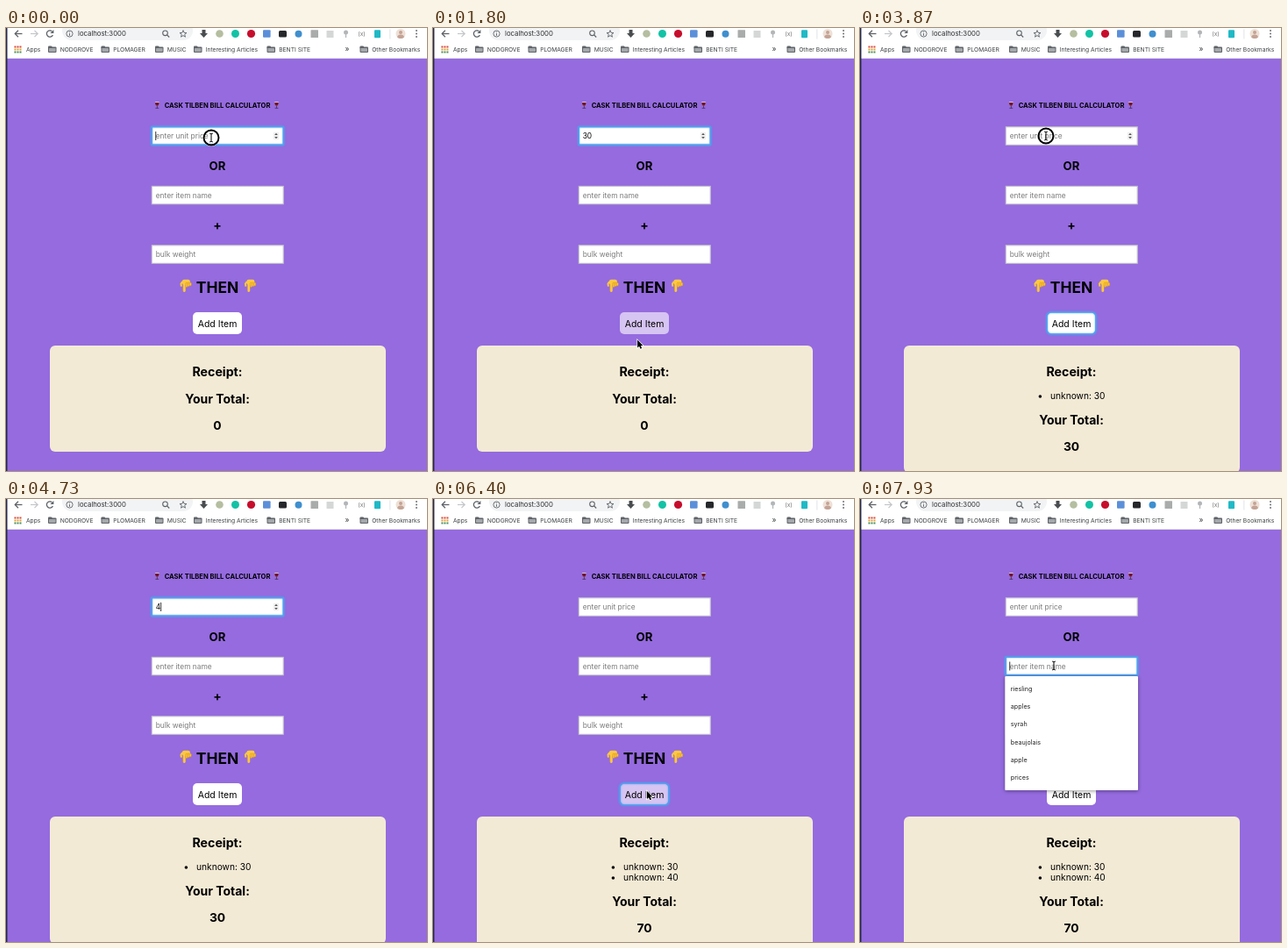
An HTML page with a canvas for the animation above (8 s loop, 480 by 505 pixels).

```html
<!DOCTYPE html>
<html lang="en">
<head>
<meta charset="utf-8">
<title>Bill calculator</title>
<style>
html, body { margin: 0; width: 100%; height: 100%; overflow: hidden; background: #956bdf; }
canvas { display: block; width: 480px; height: 505px; }
</style>
</head>
<body>
<canvas id="stage"></canvas>
<script>
const W = 480, H = 505, LOOP = 8000, LAG = 40;
const canvas = document.getElementById('stage');
const c = canvas.getContext('2d');
const dpr = window.devicePixelRatio || 1;
canvas.width = W * dpr;
canvas.height = H * dpr;

const BLUE = '#4f9fee', GREY = '#5f6368';
const fields = [
  { y: 112.5, hint: 'enter unit price', number: true },
  { y: 180, hint: 'enter item name' },
  { y: 247.5, hint: 'bulk weight', number: true }
];
const options = ['riesling', 'apples', 'syrah', 'beaujolais', 'apple', 'prices'];

// Pointer stops: time, x, y
const path = [
  [0, 234, 125], [1200, 234, 125], [1960, 233, 385], [2250, 240, 338],
  [2400, 240, 338], [3268, 206, 123], [3700, 212, 123], [5200, 212, 123],
  [5829, 230, 336], [6050, 244, 333], [6750, 244, 333], [7500, 221, 190], [8000, 221, 190]
];
const clicks = [[0, 140], [2270, 2400], [3830, 4000], [6160, 6300], [7540, 7700]];
const within = (t, a, b) => t >= a && t < b;

function pointer(t) {
  t = Math.max(0, t);
  let i = 1;
  while (i < path.length - 1 && path[i][0] <= t) i++;
  const [t0, x0, y0] = path[i - 1], [t1, x1, y1] = path[i];
  const u = Math.min(1, (t - t0) / (t1 - t0)), e = u * u * (3 - 2 * u);
  return { x: x0 + (x1 - x0) * e, y: y0 + (y1 - y0) * e };
}

const overField = (p, f) => p.x > 166 && p.x < 316 && p.y > f.y && p.y < f.y + 21;
const overButton = p => p.x > 213 && p.x < 269 && p.y > 324 && p.y < 349.5;

function stateAt(t) {
  const s = { focus: 0, since: 0, price: '', items: [] };
  const events = [
    [870, () => { s.price = '3'; s.since = 870; }],
    [1060, () => { s.price = '30'; s.since = 1060; }],
    [2330, () => { s.price = ''; s.items = [30]; s.focus = 'button'; }],
    [3930, () => { s.focus = 0; s.since = 3930; }],
    [4730, () => { s.price = '4'; s.since = 4730; }],
    [4930, () => { s.price = '40'; s.since = 4930; }],
    [6210, () => { s.price = ''; s.items = [30, 40]; s.focus = 'button'; }],
    [7600, () => { s.focus = 1; s.since = 7600; }]
  ];
  for (const [at, run] of events) if (t >= at) run();
  s.menu = t >= 7800;
  s.hidePointer = within(t, 870, 1200) || within(t, 4730, 5200);
  return s;
}

// y is the middle of the capitals
function text(str, x, y, size, { weight = 400, color = '#000', align = 'left' } = {}) {
  c.font = `${weight} ${size}px Inter, "Open Sans", sans-serif`;
  c.fillStyle = color;
  c.textAlign = align;
  c.fillText(str, x, y + size * 0.36);
}
const heading = (str, y, size = 14.2) => text(str, 241, y, size, { weight: 700, align: 'center' });

function box(x, y, w, h, r, fill) {
  c.beginPath();
  c.roundRect(x, y, w, h, r);
  if (fill) { c.fillStyle = fill; c.fill(); }
}
function disc(x, y, r, fill) {
  c.beginPath();
  c.arc(x, y, r, 0, Math.PI * 2);
  c.fillStyle = fill;
  c.fill();
}
function line(points, color, width = 1, close = false) {
  c.beginPath();
  points.forEach(([x, y], i) => i ? c.lineTo(x, y) : c.moveTo(x, y));
  if (close) c.closePath();
  c.strokeStyle = color;
  c.lineWidth = width;
  c.stroke();
}
function poly(points, fill) {
  c.beginPath();
  points.forEach(([x, y]) => c.lineTo(x, y));
  c.closePath();
  c.fillStyle = fill;
  c.fill();
}
function circle(x, y, r, color, width = 1, from = 0, to = Math.PI * 2) {
  c.beginPath();
  c.arc(x, y, r, from, to);
  c.strokeStyle = color;
  c.lineWidth = width;
  c.stroke();
}

function folder(x) {
  box(x, 20.5, 4.5, 3, 1, GREY);
  box(x, 21.5, 9.5, 6.5, 1, GREY);
  box(x + 1, 23, 7.5, 4, 0.4, '#a5a8ab');
}

function toolbar() {
  c.fillStyle = '#fff';
  c.fillRect(1, 0, W, 35);
  box(64, -8, 149, 22, 11, '#f1f3f4');

  line([[18.5, 6.5], [10.5, 6.5]], GREY, 1.3);
  line([[14, 2.8], [10.3, 6.5], [14, 10.2]], GREY, 1.3);
  line([[28, 6.5], [36, 6.5]], '#c3c5c8', 1.2);
  line([[32.5, 2.8], [36.2, 6.5], [32.5, 10.2]], '#c3c5c8', 1.2);
  circle(50, 6.5, 3.6, GREY, 1.3, 0.4, 5.4);
  poly([[54.4, 2], [54.4, 6], [50.4, 6]], GREY);
  circle(72.5, 6.5, 3.6, GREY, 0.9);
  line([[72.5, 6], [72.5, 8.8]], GREY, 0.9);
  line([[72.5, 4.2], [72.5, 5]], GREY, 0.9);
  text('localhost:3000', 82, 6.5, 7.75, { color: '#2b2d30' });

  circle(181.5, 5.8, 2.8, GREY, 1.1);
  line([[183.6, 7.9], [186.2, 10.5]], GREY, 1.2);
  const star = Array.from({ length: 10 }, (_, i) => {
    const a = -Math.PI / 2 + i * Math.PI / 5, r = i % 2 ? 1.8 : 4.2;
    return [202 + r * Math.cos(a), 6.8 + r * Math.sin(a)];
  });
  line(star, GREY, 0.9, true);

  poly([[223.5, 2], [227.5, 2], [227.5, 6], [230, 6], [225.5, 11], [221, 6], [223.5, 6]], '#4a4d50');
  disc(243.5, 6.5, 4.3, '#b5bea0');
  disc(261.5, 6.5, 4.5, '#13c2a5');
  disc(279.5, 6.5, 4.6, '#c70d2c');
  box(293, 2.2, 8.6, 8.6, 1, '#5b8fd9');
  box(311, 3, 9, 7.5, 1.5, '#25272a');
  disc(333.5, 6.8, 4, '#3f8fce');
  box(347.5, 2.2, 8.5, 8.8, 0.5, '#a9acab');
  box(365.5, 3, 8, 8, 0.5, '#d5d7d7');
  disc(387.5, 5, 2.5, '#b3b6b9');
  line([[387.5, 7], [387.5, 11]], '#b3b6b9', 1.3);
  text('(x)', 405.5, 6.5, 6.8, { color: '#777', align: 'center' });
  box(420, 2.2, 7, 9, 1, '#20b9c5');
  c.fillStyle = '#dadce0';
  c.fillRect(437.5, 1.5, 0.8, 11);
  disc(450, 6.5, 5.5, '#eee0d6');
  c.save();
  c.beginPath();
  c.arc(450, 6.5, 5.5, 0, 7);
  c.clip();
  disc(450, 5, 2, '#c3a395');
  disc(450, 11.5, 4, '#c3a395');
  c.restore();
  for (let i = 0; i < 3; i++) disc(468, 3 + i * 3.5, 0.9, GREY);

  for (let i = 0; i < 9; i++) {
    c.fillStyle = ['#d9483b', '#e2a02f', '#4b8f5a'][Math.floor(i / 3)];
    c.fillRect(9.5 + i % 3 * 3, 20.5 + Math.floor(i / 3) * 3, 2, 2);
  }
  const bar = { color: '#3c4043' };
  text('Apps', 23, 24.5, 6.7, bar);
  const marks = [[48, 'NODGROVE'], [108.5, 'PLOMAGER'], [170, 'MUSIC'], [214, 'Interesting Articles'], [297.5, 'BENTI SITE'], [403.5, 'Other Bookmarks']];
  for (const [x, name] of marks) {
    folder(x);
    text(name, x + 13.7, 24.5, 6.7, bar);
  }
  text('»', 386.5, 24, 8.5, bar);
  c.fillStyle = '#d8d4e2';
  c.fillRect(1, 34, W, 0.8);
}

function wineGlass(x, y) {
  box(x - 2.3, y - 4, 4.6, 4.8, [0.5, 0.5, 2.3, 2.3], '#d6c3dc');
  box(x - 2.2, y - 2.9, 4.4, 3.6, [0, 0, 2.2, 2.2], '#6f1230');
  c.fillStyle = '#48304f';
  c.fillRect(x - 0.4, y + 0.6, 0.8, 2.6);
  c.fillRect(x - 1.9, y + 2.9, 3.8, 0.8);
}

function hand(x, y) {
  const skin = '#fdc93f', edge = '#d9931c';
  box(x - 4.6, y - 7.2, 9, 6, 2.2, skin);
  box(x - 3.7, y - 4, 2.9, 11, 1.4, skin);
  for (let i = 0; i < 3; i++) {
    box(x - 0.7 + i * 2.1, y - 3.8, 2.2, 5.2 - i * 0.7, 1.1, skin);
    c.strokeStyle = edge;
    c.lineWidth = 0.6;
    c.stroke();
  }
  line([[x - 4.2, y - 5], [x - 6, y - 2.4], [x - 5.6, y + 0.6]], skin, 2);
  line([[x - 3.8, y - 1.5], [x - 3.6, y + 6]], edge, 0.5);
}

function focusRing(x, y, w, h, r) {
  c.save();
  c.shadowColor = BLUE;
  c.shadowBlur = 2 * dpr;
  box(x, y, w, h, r);
  c.strokeStyle = BLUE;
  c.lineWidth = 1.7;
  c.stroke();
  c.restore();
}

function spinner(y) {
  box(304.8, y - 4.2, 6.4, 8.4, 1, '#f0f0f0');
  poly([[306.2, y - 1], [308, y - 3.2], [309.8, y - 1]], '#555');
  poly([[306.2, y + 1], [308, y + 3.2], [309.8, y + 1]], '#555');
}

function field(f, i, s, hover, t) {
  const mid = f.y + 10.5, focused = s.focus === i;
  const value = i === 0 ? s.price : '';
  c.fillStyle = '#fff';
  c.fillRect(166, f.y, 150.5, 21);
  c.strokeStyle = '#b9b4c4';
  c.lineWidth = 1;
  c.strokeRect(166.2, f.y + 0.3, 150, 20.5);
  if (focused) focusRing(166, f.y, 150.5, 20.8, 0.5);
  text(value || f.hint, 170.7, mid, 8.4, { color: value ? '#000' : '#7b7b7b' });
  if (focused && (t - s.since) % 1000 < 500) {
    const x = 170.4 + (value ? c.measureText(value).width + 0.5 : 0);
    c.fillStyle = '#000';
    c.fillRect(x, mid - 5, 0.8, 10);
  }
  if (f.number && (focused || hover)) spinner(mid);
}

function receipt(items) {
  const n = items.length, shift = n ? 12.2 + 11.9 * n : 0;
  box(50, 362, 383, 121 + shift, 6, '#f3ead5');
  heading('Receipt:', 392);
  items.forEach((price, i) => {
    const y = 419.5 + i * 12;
    disc(205.4, y + 0.5, 1.8, '#000');
    text('unknown: ' + price, 217, y, 10.2);
  });
  heading('Your Total:', 422.7 + shift, 14);
  heading(String(items.reduce((a, b) => a + b, 0)), 453.3 + shift, 13.8);
}

function menu() {
  c.save();
  c.shadowColor = 'rgba(0,0,0,.4)';
  c.shadowBlur = 4 * dpr;
  c.shadowOffsetY = dpr;
  box(165.3, 202, 151.7, 130, 1, '#fff');
  c.restore();
  options.forEach((name, i) => text(name, 171.8, 216.2 + i * 20.25, 7.2, { color: '#222' }));
}

function drawPointer(p) {
  if (fields.some(f => overField(p, f))) {
    const ibeam = [[0, -4.5], [0, 4.5]];
    const at = pts => pts.map(([x, y]) => [p.x + x, p.y + y]);
    line(at(ibeam), '#111', 1.1);
    line(at([[-2, -5], [0, -4.3], [2, -5]]), '#111', 0.9);
    line(at([[-2, 5], [0, 4.3], [2, 5]]), '#111', 0.9);
    return;
  }
  const arrow = [[0, 0], [0, 9], [2, 7.2], [3.4, 10.2], [5, 9.5], [3.7, 6.6], [6.3, 6.4]]
    .map(([x, y]) => [p.x + x, p.y + y]);
  line(arrow, '#fff', 1.4, true);
  poly(arrow, '#000');
}

function draw(t) {
  const s = stateAt(t), p = pointer(t), hot = pointer(t - LAG);
  c.setTransform(dpr, 0, 0, dpr, 0, 0);
  c.fillStyle = '#956bdf';
  c.fillRect(0, 0, W, H);
  toolbar();
  c.fillStyle = '#252849';
  c.fillRect(0, 0, 1.5, H);

  text('CASK TILBEN BILL CALCULATOR', 241, 88, 7.6, { weight: 700, align: 'center' });
  wineGlass(172.3, 88);
  wineGlass(308.5, 88);
  fields.forEach((f, i) => field(f, i, s, !s.hidePointer && overField(hot, f), t));
  heading('OR', 157, 13.2);
  heading('+', 225, 14);
  heading('THEN', 296, 17.4);
  hand(205.5, 294);
  hand(279, 294);

  box(213, 324, 56, 25, 5, overButton(hot) ? '#d6c4f2' : '#fff');
  if (s.focus === 'button') focusRing(213, 324, 56, 25, 5);
  text('Add Item', 241, 337, 10.5, { align: 'center' });
  receipt(s.items);
  if (s.menu) menu();

  if (!s.hidePointer) drawPointer(p);
  if (clicks.some(([a, b]) => within(t, a, b))) {
    circle(p.x, p.y, 9.6, 'rgba(255,255,255,.6)', 1);
    circle(p.x, p.y, 8.5, '#000', 1.9);
  }
}

const start = performance.now();
function tick() {
  draw((performance.now() - start) % LOOP);
  requestAnimationFrame(tick);
}
tick();
</script>
</body>
</html>
```
